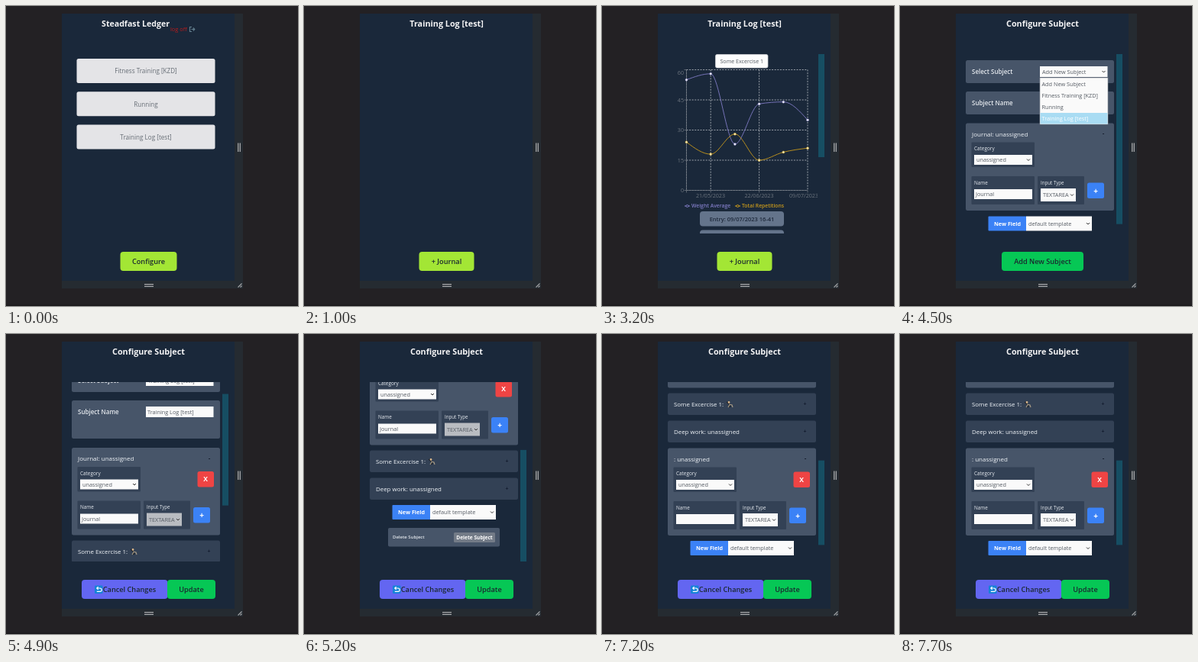
An HTML page for the animation above (8000 ms loop, 382 by 393 pixels).

```html
<!DOCTYPE html>
<html lang="en">
<head>
<meta charset="utf-8">
<title>Training tracker</title>
<style>
  html, body { margin: 0; width: 100%; height: 100%; overflow: hidden; background: #232124; }
  svg { display: block; width: 100%; height: 100%; }
  text { font-family: "Open Sans", "Noto Sans", sans-serif; white-space: pre; }
</style>
</head>
<body>
<svg id="stage" viewBox="0 0 382 393"></svg>
<script>
const LOOP = 8000, STEP = 100;
const VIEW = { top: 63, height: 235 };
const C = {
  page: '#1a283a', card: '#475569', dark: '#334155', thumb: '#164e63',
  lime: '#a3e635', green: '#06c755', blue: '#3b82f6', indigo: '#6366f1', red: '#ef4444',
  purple: '#7f7bc4', gold: '#c8991c', ink: '#1e293b', field: '#fafafa', grey: '#555b63', pale: '#e5e9ee'
};

// Drawing helpers; text is placed by the middle of its capitals.
const box = (x, y, w, h, fill, r = 0, extra = '') =>
  `<rect x="${x}" y="${y}" width="${w}" height="${h}" rx="${r}" fill="${fill}" ${extra}/>`;
const label = (str, x, y, size, fill, weight = 400, anchor = 'start') =>
  `<text x="${x}" y="${y + size * 0.357}" font-size="${size}" fill="${fill}" font-weight="${weight}" text-anchor="${anchor}">${str}</text>`;
const mid = (str, x, y, size, fill, weight) => label(str, x, y, size, fill, weight, 'middle');
const stroke = (d, color, w = 1, extra = '') =>
  `<path d="${d}" fill="none" stroke="${color}" stroke-width="${w}" ${extra}/>`;
const group = (id, body, extra = '') => `<g id="${id}" ${extra}>${body}</g>`;
const button = (str, x, w, fill, tx = x + w / 2) =>
  box(x, 322, w, 25, fill, 4) + mid(str, tx, 334.5, 9.2, '#1b2830', 600);
const title = str => mid(str, 186.5, 23, 10.8, '#f4f4f5', 700);
const select = (str, x, y, w, h, fill = C.field) =>
  box(x, y, w, h, fill) + label(str, x + 3, y + h / 2, 7.3, C.grey) +
  stroke(`M${x + w - 7} ${y + h / 2 - 1}l2 2l2 -2`, '#333', 1);
const input = (str, x, y, w, h) =>
  box(x, y, w, h, C.field) + label(str, x + 2, y + h / 2, 7.3, C.grey);

function frame() {
  return box(0, 391.5, 382, 1.5, '#1a191b') +
    box(73, 10, 237, 360, '#252b31') + box(73, 10, 226, 350, C.page) +
    stroke('M303.7 179.5v11.5M306.3 179.5v11.5M181 364.7h12M181 367.3h12', '#a6a8aa', 1.3) +
    stroke('M303.5 368.5l5 -5M306.5 368.5l2 -2', '#a6a8aa', 1.1);
}

function home() {
  const cards = ['Fitness Training [KZD]', 'Running', 'Training Log [test]'];
  return label('Steadfast Ledger', 214, 23, 10.6, '#f4f4f5', 700, 'end') +
    label('log off', 215, 30.5, 7.4, '#b91c1c') +
    stroke('M243 27.5h-2.5v6h2.5M242.5 30.5h4M244.8 28.5l2 2l-2 2', '#64808f', 1.1) +
    cards.map((s, i) =>
      box(92.5, 69 + i * 43.2, 181, 32, '#e4e4e7', 2.5) + mid(s, 183, 85.5 + i * 43.2, 8.1, '#666d75')).join('') +
    button('Configure', 149.5, 74, C.lime);
}

const PLOT = { x: 110.5, y: 83.5, w: 158.5, h: 158 };
const toPoints = values => values.map((v, i) =>
  [PLOT.x + i * PLOT.w / 5, PLOT.y + PLOT.h * (1 - v / 60)]);

// Monotone cubic through evenly spaced points.
function monotone(pts) {
  const dx = pts[1][0] - pts[0][0], n = pts.length;
  const s = pts.slice(1).map((p, i) => (p[1] - pts[i][1]) / dx);
  const m = pts.map((_, i) => {
    if (i === 0 || i === n - 1) return 0;
    const a = s[i - 1], b = s[i];
    return (Math.sign(a) + Math.sign(b)) * Math.min(Math.abs(a), Math.abs(b), Math.abs(a + b) / 4);
  });
  m[0] = (3 * s[0] - m[1]) / 2;
  m[n - 1] = (3 * s[n - 2] - m[n - 2]) / 2;
  return 'M' + pts[0] + pts.slice(1).map(([x, y], i) => {
    const [px, py] = pts[i];
    return `C${px + dx / 3} ${py + m[i] * dx / 3} ${x - dx / 3} ${y - m[i + 1] * dx / 3} ${x} ${y}`;
  }).join('');
}

function series(values, color, dotFill) {
  const pts = toPoints(values);
  return stroke(monotone(pts), color, 0.9, 'class="line" pathLength="1"') +
    `<g class="dots">${pts.map(([x, y]) =>
      `<circle cx="${x}" cy="${y}" r="1.5" fill="${dotFill}" stroke="${color}" stroke-width=".5"/>`).join('')}</g>`;
}

function legend(str, x, color) {
  return stroke(`M${x} 262h7`, color, 1.1) +
    `<circle cx="${x + 3.5}" cy="262" r="1.5" fill="${C.page}" stroke="${color}"/>` +
    label(str, x + 9, 261.8, 6.8, color, 600);
}

function chart() {
  const { x, y, w, h } = PLOT, axis = '#6c747e';
  const rows = [0, 1, 2, 3, 4].map(i => y + i * h / 4);
  const cols = [0, 0.2, 0.6, 1].map(f => x + f * w);
  const grid = rows.map(r => `M${x} ${r}h${w}`).join('') + cols.map(c => `M${c} ${y}v${h}`).join('');
  const ticks = rows.map(r => `M${x - 3} ${r}h3`).join('') + cols.map(c => `M${c} ${y + h}v3`).join('');
  return box(148.5, 63.5, 68.5, 17.5, '#fdfdfd', 2, 'stroke="#d4d4d8" stroke-width=".7"') +
    mid('Some Excercise 1', 182.8, 72.5, 7.1, C.grey) +
    stroke(grid, '#b9bec4', 0.8, 'stroke-dasharray="2 1.6"') +
    stroke(`M${x} ${y}v${h}h${w}${ticks}`, axis, 0.8) +
    rows.map((r, i) => label(60 - i * 15, 107, i ? r : r + 4, 7.2, axis, 400, 'end')).join('') +
    mid('21/05/2023', 142, 248, 7.2, axis) + mid('22/06/2023', 205.5, 248, 7.2, axis) +
    mid('09/07/2023', 264, 248, 7.2, axis) +
    series([55, 58, 23, 43, 44, 35], C.purple, '#fff') +
    series([24, 18, 28, 15, 19, 21], C.gold, '#fff4c4') +
    legend('Weight Average', 108, C.purple) + legend('Total Repetitions', 174, C.gold) +
    box(128, 269, 110, 19.5, '#64748b', 4) +
    mid('Entry: 09/07/2023 16-41', 183, 279, 7.5, C.ink, 600) +
    box(128, 293.5, 110, 19.5, '#64748b', 4);
}

const row = (str, y, h, field) =>
  box(86, y, 194, h, C.card, 2.5) + label(str, 94, y + 15, 8, C.pale, 600) + field;

function fieldCard(name, top, { removable = true, locked = false } = {}) {
  return box(86, top, 194, 114.5, C.card, 2.5) +
    label(`${name}: unassigned`, 94, top + 14.5, 8, '#f1f5f9') +
    mid('-', 266, top + 14, 8, '#111827', 600) +
    box(93.5, top + 25, 82.5, 32.5, C.dark, 1) +
    label('Category', 97, top + 33.5, 6.4, C.pale, 500) + select('unassigned', 97, top + 41.5, 76, 13) +
    box(93.5, top + 69.5, 82.5, 37, C.dark, 1) +
    label('Name', 97, top + 78, 6.4, C.pale, 500) + input(name, 97, top + 86.5, 76, 13) +
    box(180, top + 69.5, 61, 37, C.dark, 1) +
    label('Input Type', 184, top + 78, 6.2, C.pale, 500) +
    select('TEXTAREA', 184, top + 85.5, 46, 17, locked ? '#b9bcc1' : C.field) +
    box(245, top + 78, 22, 20.5, C.blue, 2.5) + mid('+', 256, top + 88.5, 10, '#fff', 700) +
    (removable ? box(250.5, top + 31, 21.5, 20.5, C.red, 2.5) + mid('X', 261.2, top + 41.3, 8.5, '#fff', 700) : '');
}

const folded = (str, y) => box(86, y, 194, 28.5, C.dark, 2.5) +
  label(str, 94, y + 14.5, 7.9, '#f1f5f9') + mid('+', 265.5, y + 14.5, 7, '#0f172a', 600);

const newField = y => box(115.5, y, 50, 19, C.blue, 1) + mid('New Field', 140.5, y + 9.5, 7.2, '#fff', 700) +
  select('default template', 165, y, 86, 19);

const deleteRow = y => box(110, y, 146, 24.5, C.card, 2) + label('Delete Subject', 116, y + 11.5, 6, C.pale, 600) +
  box(196, y + 6, 54, 13, '#737b87', 1.5) + mid('Delete Subject', 223, y + 12.7, 6.6, '#fff', 700);

// Tiny climbing figure beside the exercise name.
const climber = y => stroke(`M163.5 ${y - 3}l3 3l1 4`, '#15181d', 1.6) +
  `<circle cx="166" cy="${y - 2.5}" r="1.4" fill="#d6b48a"/>` +
  stroke(`M166 ${y}l4 1l1 3M167 ${y + 1}l-2 3`, '#a99c86', 1.2);

function blankForm() {
  return row('Select Subject', 71, 30, select('Add New Subject', 183, 79, 88.5, 14)) +
    row('Subject Name', 112, 30, input('', 183, 120, 88.5, 14)) +
    fieldCard('Journal', 153.5, { removable: false }) + newField(275.5);
}

function menu() {
  const items = ['Add New Subject', 'Fitness Training [KZD]', 'Running', 'Training Log [test]'];
  return box(183, 94, 89, 61, C.field, 0, 'stroke="#8b9097" stroke-width=".6"') +
    box(183.5, 140, 88, 14.5, '#a9dcf3') +
    items.map((s, i) => label(s, 185.5, 102 + i * 15, 7.3, i === 3 ? '#fff' : C.grey)).join('');
}

function subjectForm() {
  return row('Select Subject', 71, 30, select('Training Log [test]', 183, 79, 88.5, 14)) +
    row('Subject Name', 112, 50, input('Training Log [test]', 183, 120, 88.5, 14)) +
    fieldCard('Journal', 174, { locked: true }) +
    folded('Some Excercise 1:', 295.5) + climber(310) +
    folded('Deep work: unassigned', 331.5) +
    group('added', fieldCard('', 367.5)) +
    group('tail', newField(367) + deleteRow(397));
}

const saveBar = () => button('Cancel Changes', 99, 112.5, C.indigo, 161.5) + button('Update', 211, 63, C.green) +
  box(116, 329.5, 10.5, 10.5, '#1683d8', 1) +
  stroke('M119 333h4a2 2 0 0 1 0 4.3h-4.2M120.6 331.2l-1.8 1.8l1.8 1.8', '#fff', 1.2);

const clipped = 'clip-path="url(#view)"';
document.getElementById('stage').innerHTML =
  `<clipPath id="view">${box(80, VIEW.top, 202, VIEW.height, '#000')}</clipPath>` + frame() +
  group('home', home()) +
  group('log', title('Training Log [test]') + button('+ Journal', 150.5, 72, C.lime)) +
  group('chart', chart(), clipped) +
  group('config', title('Configure Subject')) +
  group('blank', blankForm() + button('Add New Subject', 133, 107, C.green)) +
  group('menu', menu()) +
  group('subject', group('list', subjectForm()), clipped) +
  group('save', saveBar()) +
  box(283, VIEW.top, 8, 0, C.thumb, 0, 'id="thumb"');

const el = id => document.getElementById(id);
const lines = document.querySelectorAll('.line'), dots = document.querySelectorAll('.dots');

const SHOWN = {
  home: [0, 500], log: [500, 3700], chart: [1600, 3700], config: [3700, LOOP],
  blank: [3700, 4600], menu: [4500, 4600], subject: [4600, LOOP], save: [4600, LOOP],
  added: [6100, LOOP], thumb: [1600, LOOP]
};
const CONTENT = [[0, 409], [3700, 248], [4600, 378], [6100, 499]];
const SCROLL = [[0, 0], [4900, 25], [5000, 80], [5100, 128], [5200, 143],
  [6500, 157], [6600, 186.5], [6700, 209], [6800, 218]];
const at = (table, t) => table.filter(([start]) => start <= t).pop()[1];

// CSS "ease" curve, solved by bisection.
function ease(x) {
  if (x <= 0) return 0;
  if (x >= 1) return 1;
  const bez = (a, b, u) => 3 * a * u * (1 - u) ** 2 + 3 * b * u * u * (1 - u) + u ** 3;
  let lo = 0, hi = 1;
  for (let i = 0; i < 20; i++) {
    const u = (lo + hi) / 2;
    if (bez(0.25, 0.25, u) < x) lo = u; else hi = u;
  }
  return bez(0.1, 1, lo);
}

function render(ms) {
  const t = Math.floor((ms % LOOP) / STEP) * STEP;
  for (const [id, [from, to]] of Object.entries(SHOWN))
    el(id).style.display = t >= from && t < to ? '' : 'none';

  const drawn = ease((t - 1700) / 1500);
  lines.forEach(l => l.setAttribute('stroke-dasharray', drawn < 1 ? `${drawn} 2` : 'none'));
  dots.forEach(d => { d.style.display = drawn < 1 ? 'none' : ''; });

  const scroll = at(SCROLL, t), ratio = VIEW.height / at(CONTENT, t);
  el('list').setAttribute('transform', `translate(0 ${-scroll})`);
  el('tail').setAttribute('transform', `translate(0 ${t >= 6100 ? 122 : 0})`);
  el('thumb').setAttribute('y', VIEW.top + scroll * ratio);
  el('thumb').setAttribute('height', VIEW.height * ratio);
}

const begin = performance.now();
function tick() {
  render(performance.now() - begin);
  requestAnimationFrame(tick);
}
tick();
</script>
</body>
</html>
```
